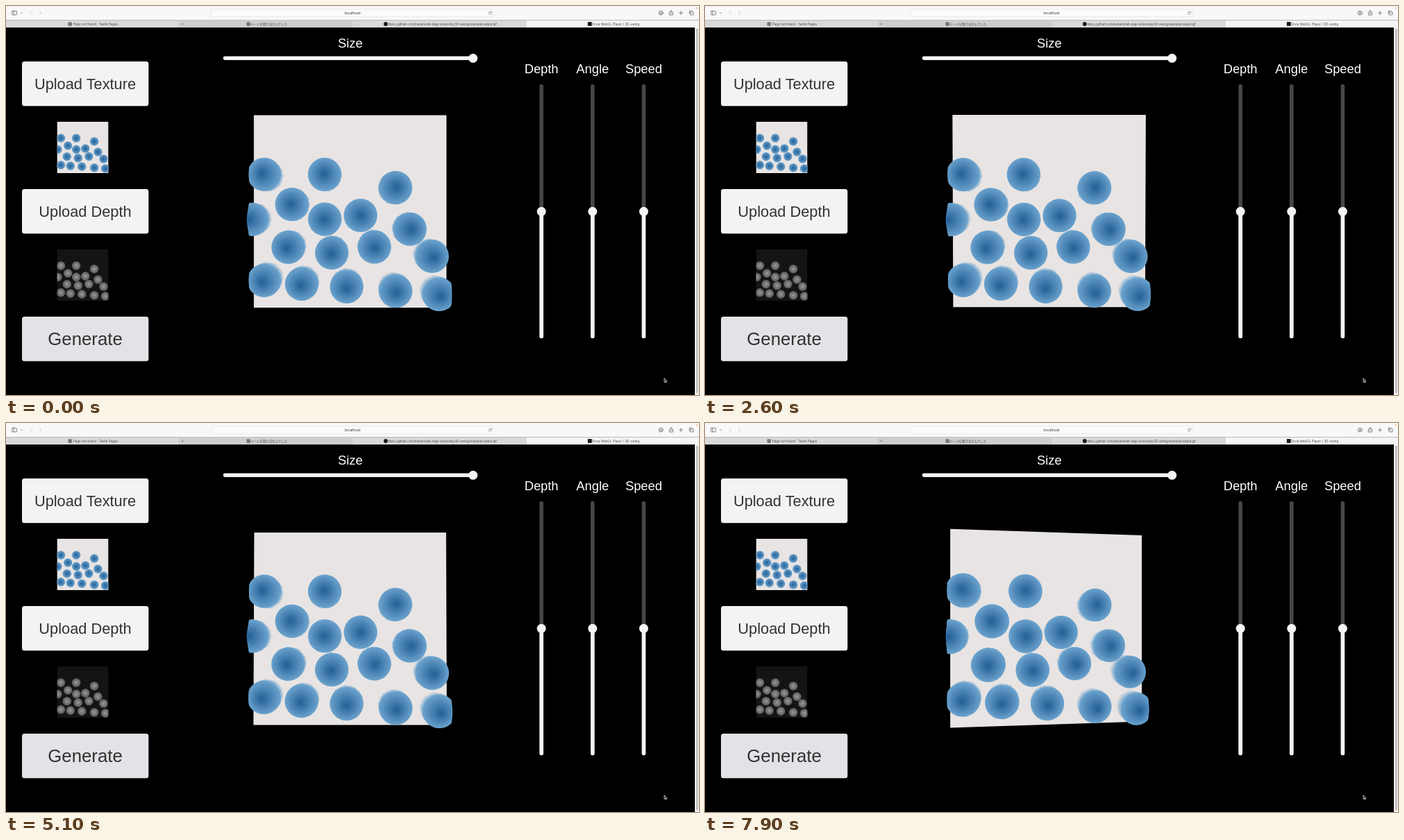
An HTML page with a canvas for the animation above (8 s loop, 998 by 561 pixels).

```html
<!DOCTYPE html>
<html lang="en">
<head>
<meta charset="utf-8">
<title>3D swing</title>
<style>
  html, body { margin: 0; width: 100%; height: 100%; overflow: hidden; background: #000; }
  #ui, #view { position: absolute; left: 0; top: 0; width: 998px; height: 561px; display: block; }
  text { text-anchor: middle; font-family: "Liberation Sans", Arial, sans-serif; }
  .label { font-size: 18.3px; fill: #fff; }
  .button { font-size: 21.8px; fill: #323232; }
  .tab { font: 4.6px Inter, "Noto Sans CJK JP", "Noto Sans CJK", sans-serif; fill: #4c4c4c; }
  .icon { fill: none; stroke: #666; stroke-width: .8; stroke-linecap: round; stroke-linejoin: round; }
</style>
</head>
<body>
<svg id="ui" viewBox="0 0 998 561">
  <defs>
    <radialGradient id="blue"><stop offset="0" stop-color="#225f96"/><stop offset=".9" stop-color="#639bc7"/><stop offset="1" stop-color="#8fb6d2"/></radialGradient>
    <radialGradient id="grey"><stop offset="0" stop-color="#9a9a98"/><stop offset="1" stop-color="#585856"/></radialGradient>
  </defs>

  <!-- browser bar -->
  <rect width="998" height="20.5" fill="#f8f8fa"/>
  <rect y="20.5" width="749" height="10.5" fill="#d9d9d9"/>
  <rect x="249.5" y="20.5" width="249" height="10.5" fill="#cecece"/>
  <rect x="749" y="20.5" width="249" height="10.5" fill="#f5f5f6"/>
  <path d="M249.5 20.5v10.5M498.7 20.5v10.5M749 20.5v10.5M0 20.5h749" stroke="#c2c2c2" stroke-width=".6"/>
  <rect x="295.5" y="5" width="406.5" height="10.4" rx="2.5" fill="#fbfbfc" stroke="#e3e3e8" stroke-width=".7"/>
  <text class="tab" x="499" y="12" style="font-size:5.4px;fill:#333">localhost</text>
  <g class="icon">
    <rect x="8.6" y="7.2" width="7" height="5.6" rx="1"/>
    <path d="M11 7.2v5.6M21.4 9.6l1.2 1.2 1.2-1.2"/>
    <path d="M37.4 7.4l-2.6 2.6 2.6 2.6M48.4 7.4l2.6 2.6-2.6 2.6" stroke="#c4c4c6"/>
    <path d="M699 9.2a2.1 2.1 0 1 0 .2 1.6M699.2 7.9v1.5h-1.5" stroke-width=".6"/>
    <circle cx="943.2" cy="10" r="3"/>
    <path d="M943.2 8.2v3.2M941.9 10.3l1.3 1.3 1.3-1.3"/>
    <path d="M956.4 9h-1v4h5v-4h-1M958 11V6.6M956.7 7.8L958 6.5l1.3 1.3"/>
    <path d="M969.5 10h5M972 7.5v5"/>
    <path d="M986 8.8h4v4h-4zM984.2 11V7h4"/>
    <path d="M253 25l2 2M255 25l-2 2" stroke-width=".6"/>
  </g>
  <circle cx="995" cy="3" r="1" fill="#f2a25c"/>
  <rect x="89.5" y="23.3" width="5.4" height="5.4" rx="1" fill="#777"/>
  <rect x="346.5" y="23.3" width="5.4" height="5.4" rx="1" fill="#777"/>
  <circle cx="546.8" cy="26" r="2.9" fill="#1b1b1b"/>
  <rect x="837.8" y="23" width="5.8" height="5.8" fill="#1b1b1b"/>
  <text class="tab" x="129" y="27.6">Page not found · Tavlin Pages</text>
  <text class="tab" x="378.5" y="27.6" style="font-size:4.5px">ページを開けませんでした</text>
  <text class="tab" x="628" y="27.6" style="font-size:4.4px">https://github.com/hanamolab-nagi-university/3D-swing/example/output.gif</text>
  <text class="tab" x="878" y="27.6">Orvia WebGL Player | 3D-swing</text>

  <!-- scroll bar -->
  <rect x="992" y="31" width="6" height="530" fill="#f6f6f6"/>
  <rect x="993.8" y="32.5" width="3" height="526" rx="1.5" fill="#bdbdbd"/>

  <!-- left panel -->
  <rect x="23" y="80" width="182.3" height="64.3" rx="3.5" fill="#f3f2f4"/>
  <rect x="23" y="264" width="182.3" height="64.3" rx="3.5" fill="#f3f2f4"/>
  <rect x="23" y="448" width="182.3" height="64.3" rx="3.5" fill="#e3e2e6"/>
  <text class="button" x="114" y="120">Upload Texture</text>
  <text class="button" x="114" y="304">Upload Depth</text>
  <text class="button" x="114" y="489" style="font-size:25.8px">Generate</text>
  <svg id="texture" x="73.5" y="167" width="74" height="74" viewBox="-138.7 -138.7 277.4 277.4"></svg>
  <svg id="depth" x="73.5" y="351" width="74" height="74" viewBox="-138.7 -138.7 277.4 277.4"></svg>

  <!-- sliders -->
  <text class="label" x="495.8" y="60">Size</text>
  <rect x="312.8" y="72.6" width="362" height="5.4" rx="2.4" fill="#f4f4f4"/>
  <circle cx="672.6" cy="75.3" r="6.5" fill="#f4f4f4"/>
  <g id="sliders"></g>

  <path d="M948 536.8v5.6l1.3-1.2.9 2 .9-.4-.9-1.9h1.6z" fill="#111" stroke="#fff" stroke-width=".7"/>
</svg>
<canvas id="view" width="998" height="561"></canvas>

<script>
const HALF = 138.7, RADIUS = 22.9;
const CENTER_X = 495.6, CENTER_Y = 296.2, CAMERA = 490;
const RIM = 23.5, PEAK = 36;
const LOOP = 8000, STEP = 100, DELAY = 130, SWING = 2500, ANGLE = 20 * Math.PI / 180;
const PAPER = [232, 228, 227], EDGE = [106, 161, 204], CORE = [34, 94, 149];

// ball centres, measured from the middle of the sheet
const balls = [
  [-118, -50.8], [-35, -50.8], [62.3, -32.6], [-80, -9.6], [-135, 11], [-34.8, 10.8],
  [14.3, 5.5], [82, 24.3], [-85, 49.3], [-25.2, 57], [33.3, 48.9], [112.4, 61.7],
  [-118, 95], [-66.5, 99.8], [-4.8, 103.6], [62.4, 109.5], [122, 114.1]
];

function thumb(id, back, fill) {
  const dots = balls.map(([x, y]) => `<circle cx="${x}" cy="${y}" r="23.5" fill="url(#${fill})"/>`);
  document.getElementById(id).innerHTML =
    `<rect x="-139" y="-139" width="278" height="278" fill="${back}"/>` + dots.join('');
}
thumb('texture', '#e8e4e3', 'blue');
thumb('depth', '#141413', 'grey');

document.getElementById('sliders').innerHTML = ['Depth', 'Angle', 'Speed'].map((name, i) => {
  const x = 771.1 + i * 73.65;
  return `<text class="label" x="${x}" y="97">${name}</text>
    <rect x="${x - 2.8}" y="113" width="5.6" height="366" rx="2.4" fill="#474747"/>
    <rect x="${x - 2.8}" y="294" width="5.6" height="185.3" rx="2.4" fill="#f4f4f4"/>
    <circle cx="${x}" cy="296.3" r="6.5" fill="#f4f4f4"/>`;
}).join('');

const mix = (a, b, k) => `rgb(${a.map((v, i) => Math.round(v + (b[i] - v) * k))})`;
const clamp = v => Math.max(-HALF, Math.min(HALF, v));

// each ball is a stack of discs: a ragged wall, then a cone
const slices = [];
for (let i = 0; i < 8; i++) {
  const k = i / 8;
  slices.push({ z: RIM * k, r: RADIUS, rough: .07 * (1 - k), fill: mix(PAPER, EDGE, .1 + .8 * k) });
}
for (let i = 0; i < 20; i++) {
  const k = i / 20;
  slices.push({ z: RIM + (PEAK - RIM) * k, r: RADIUS * (1 - k), rough: 0, fill: mix(EDGE, CORE, k) });
}

const POINTS = 48;
const rim = Array.from({ length: POINTS }, (_, i) => {
  const a = i / POINTS * 2 * Math.PI;
  return { x: Math.cos(a), y: Math.sin(a), notch: i * 7 % 5 / 4 };
});

const ctx = document.getElementById('view').getContext('2d');

function project(x, y, z, pitch, yaw) {
  const y1 = y * Math.cos(pitch) + z * Math.sin(pitch);
  const z1 = z * Math.cos(pitch) - y * Math.sin(pitch);
  const x2 = x * Math.cos(yaw) - z1 * Math.sin(yaw);
  const z2 = z1 * Math.cos(yaw) + x * Math.sin(yaw);
  const scale = CAMERA / (CAMERA - z2);
  return [CENTER_X + x2 * scale, CENTER_Y + y1 * scale];
}

function fillShape(points, z, fill, pitch, yaw) {
  ctx.beginPath();
  for (const [x, y] of points) ctx.lineTo(...project(x, y, z, pitch, yaw));
  ctx.fillStyle = fill;
  ctx.fill();
}

function draw(t) {
  const swing = ANGLE * Math.sin(Math.PI * Math.max(0, t - DELAY) / SWING);
  const nodding = t < DELAY + 2 * SWING;
  const pitch = nodding ? swing : 0, yaw = nodding ? 0 : swing;
  ctx.clearRect(0, 0, 998, 561);
  const sheet = [[-HALF, -HALF], [HALF, -HALF], [HALF, HALF], [-HALF, HALF]];
  fillShape(sheet, 0, mix(PAPER, PAPER, 0), pitch, yaw);
  for (const { z, r, rough, fill } of slices) {
    for (const [bx, by] of balls) {
      const disc = rim.map(p => {
        const d = r * (1 - rough * p.notch);
        return [clamp(bx + d * p.x), clamp(by + d * p.y)];
      });
      fillShape(disc, z, fill, pitch, yaw);
    }
  }
}

const start = performance.now();
let shown = -1;
function tick() {
  const t = Math.floor((performance.now() - start) % LOOP / STEP) * STEP;
  if (t !== shown) draw(shown = t);
  requestAnimationFrame(tick);
}
tick();
</script>
</body>
</html>
```
